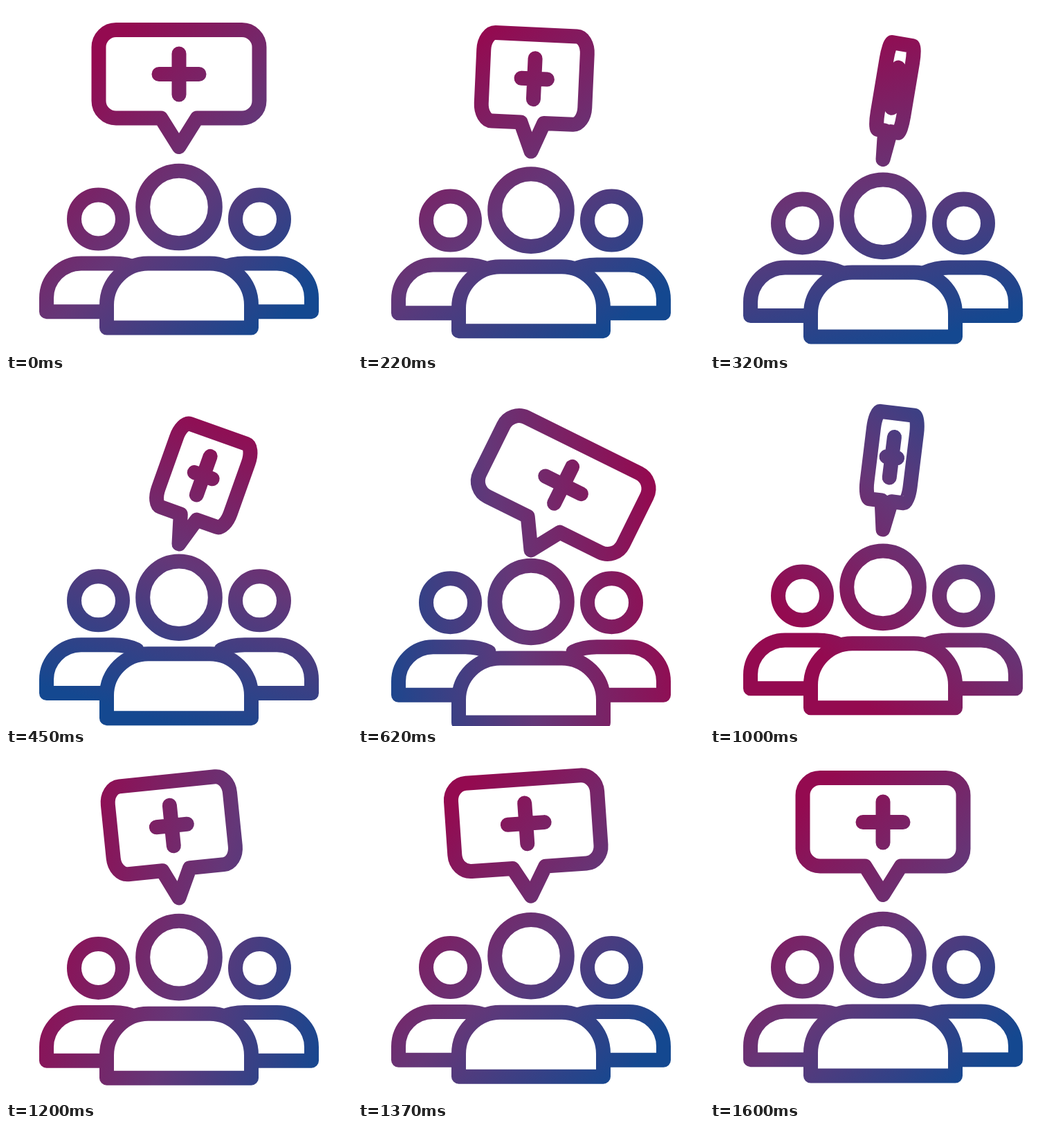
Write an HTML page with a canvas that moves like this. It is 500 px wide and 500 px high and loops after 1.62 s.

```html
<!DOCTYPE html>
<html lang="en">
<head>
<meta charset="utf-8">
<title>Group with a message</title>
<style>
  html, body { margin: 0; width: 100%; height: 100%; overflow: hidden; background: #fff; }
  canvas { display: block; width: 500px; height: 500px; }
</style>
</head>
<body>
<canvas id="stage" width="500" height="500"></canvas>
<script>
const ctx = document.getElementById('stage').getContext('2d');
const LOOP = 1620, HOLD = 94, STEP = 25, LAST = 60;
const CRIMSON = '#940a50', PURPLE = '#643778', BLUE = '#144890';

// [step, value] pairs
const DIP  = [[0, 0], [5, .155], [14, .79], [20.5, 1], [28, .725], [36, .295], [44, .105], [60, 0]];
const TURN = [[0, 0], [5, 2.6], [14, 19.6], [22, 26.5], [28, 22.5], [36, 7], [45, -6.1], [60, 0]];
const SPIN = [[0, 1], [5, .645], [14, -.475], [20.5, -1], [28, -.49], [36, .27], [44, .763], [60, 1]];

// Monotone cubic through the pairs, flat at both ends and at each turning point
function curve(keys, x) {
  let i = 0;
  while (i < keys.length - 2 && x > keys[i + 1][0]) i++;
  const slope = k => (keys[k + 1][1] - keys[k][1]) / (keys[k + 1][0] - keys[k][0]);
  const tangent = k => {
    if (k === 0 || k === keys.length - 1) return 0;
    const a = slope(k - 1), b = slope(k);
    return a * b <= 0 ? 0 : 2 * a * b / (a + b);
  };
  const [x0, y0] = keys[i], [x1, y1] = keys[i + 1];
  const w = x1 - x0, u = (x - x0) / w, v = 1 - u;
  return y0 * v * v * (1 + 2 * u) + y1 * u * u * (3 - 2 * u)
       + w * u * v * (tangent(i) * v - tangent(i + 1) * u);
}

function sweep(step) {
  const u = Math.min(step / 53, 1);
  const a = Math.PI / 4 + 2 * Math.PI * u * u * (3 - 2 * u);
  const c = Math.cos(a), s = Math.sin(a);
  const g = ctx.createLinearGradient(250 - 185 * c, 220 - 185 * s, 250 + 270 * c, 220 + 270 * s);
  g.addColorStop(0, CRIMSON);
  g.addColorStop(.5, PURPLE);
  g.addColorStop(1, BLUE);
  return g;
}

// The transform shapes the path only, so the line keeps its width
function draw(transform, path, filled) {
  ctx.save();
  ctx.beginPath();
  transform();
  path();
  ctx.restore();
  if (filled) ctx.fill();
  ctx.stroke();
}

function head(x, y, r) {
  ctx.moveTo(x + r, y);
  ctx.arc(x, y, r, 0, 2 * Math.PI);
}

function sidePerson() {
  head(133.5, 308, 35);
  ctx.moveTo(145, 441.7);
  ctx.lineTo(58.5, 441.7);
  ctx.lineTo(58.5, 422);
  ctx.arcTo(58.5, 372, 108.5, 372, 50);
  ctx.lineTo(155, 372);
  ctx.quadraticCurveTo(174, 372, 189, 379);
}

function mainPerson() {
  head(250, 290.5, 52.3);
  ctx.moveTo(145.5, 465);
  ctx.lineTo(145.5, 432);
  ctx.arcTo(145.5, 372, 205.5, 372, 60);
  ctx.arcTo(354.5, 372, 354.5, 432, 60);
  ctx.lineTo(354.5, 465);
  ctx.closePath();
}

// Placed around the tip of the tail
function bubble() {
  ctx.moveTo(0, 0);
  ctx.lineTo(-26, -41.5);
  ctx.arcTo(-116, -41.5, -116, -100, 25);
  ctx.arcTo(-116, -169, 0, -169, 25);
  ctx.arcTo(116, -169, 116, -100, 25);
  ctx.arcTo(116, -41.5, 26, -41.5, 25);
  ctx.lineTo(26, -41.5);
  ctx.closePath();
  ctx.moveTo(-29, -105);
  ctx.lineTo(29, -105);
  ctx.moveTo(0, -134.5);
  ctx.lineTo(0, -75.5);
}

function render(time) {
  const step = Math.max(0, Math.min(LAST, Math.floor((time % LOOP - HOLD) / STEP)));
  const dip = curve(DIP, step);

  ctx.fillStyle = '#fff';
  ctx.fillRect(0, 0, 500, 500);
  ctx.strokeStyle = sweep(step);
  ctx.lineWidth = 21;
  ctx.lineCap = ctx.lineJoin = 'round';

  draw(() => ctx.translate(0, 13.7 * dip), sidePerson);
  draw(() => { ctx.translate(500, 13.7 * dip); ctx.scale(-1, 1); }, sidePerson);
  draw(() => ctx.translate(0, 30 * dip), mainPerson, true);
  draw(() => {
    ctx.translate(250, 203.5 + 42.5 * dip);
    ctx.rotate(curve(TURN, step) * Math.PI / 180);
    ctx.scale(curve(SPIN, step), 1);
  }, bubble);
}

const start = performance.now();
function tick() {
  render(performance.now() - start);
  requestAnimationFrame(tick);
}
tick();
</script>
</body>
</html>
```
